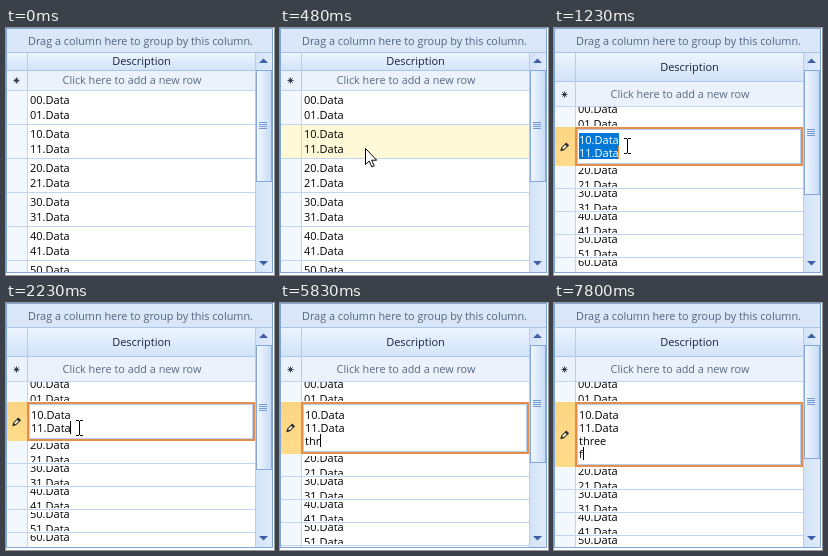
These frames come from a looping animation (268x247 px, 8 s). An HTML page with a canvas:

```html
<!DOCTYPE html>
<html lang="en">
<head>
<meta charset="utf-8">
<title>Multiline grid editor</title>
<style>
  html, body { margin: 0; width: 100%; height: 100%; overflow: hidden; background: #fff; }
  canvas { display: block; width: 268px; height: 247px; }
</style>
</head>
<body>
<canvas id="stage" width="268" height="247"></canvas>
<script>
const ctx = document.getElementById('stage').getContext('2d');
const LOOP = 8000;
const EDIT_AT = 1070, CLICK_AT = 2090, GROW_1 = 3510, GROW_2 = 6910;
const LINE = '#bfd5f0';

// time, x, y, hovered row
const ARROW = [
  [70, 158, 204, 4], [150, 132, 161, 3], [250, 106, 135, 2], [330, 93, 125, 1],
  [400, 88, 121, 1], [480, 85, 120, 1], [610, 78, 120, 1], [760, 74, 118, 1]
];
// time, x, y
const BEAM = [
  [1070, 70, 110], [1620, 70, 111], [1790, 70, 113], [1860, 70, 115], [1940, 70, 117]
];
// time, third line, caret x
const TYPING = [
  [3510, '', 25], [5280, 't', 29], [5510, 'th', 36], [5830, 'thr', 40],
  [6220, 'thre', 46], [6470, 'three', 52]
];
const CARET_OFF = [[1790, 2090], [2630, 3130], [4050, 4580], [5130, 5280], [7500, 7800]];

const stepAt = (steps, t) => steps.filter(s => s[0] <= t).pop();
const within = (t, a, b) => t >= a && t < b;

function box(x, y, w, h, fill) {
  ctx.fillStyle = fill;
  ctx.fillRect(x, y, w, h);
}

function shade(x, y, w, h, from, to, across) {
  const g = across ? ctx.createLinearGradient(x, 0, x + w, 0) : ctx.createLinearGradient(0, y, 0, y + h);
  g.addColorStop(0, from);
  g.addColorStop(1, to);
  box(x, y, w, h, g);
}

function text(str, x, y, color = '#000', align = 'left', size = 11) {
  ctx.font = size + 'px "Open Sans", "Noto Sans", sans-serif';
  ctx.textAlign = align;
  ctx.fillStyle = color;
  ctx.fillText(str, x, y);
}

function poly(points, fill, stroke) {
  ctx.beginPath();
  points.forEach(([x, y]) => ctx.lineTo(x, y));
  ctx.closePath();
  ctx.fillStyle = fill;
  ctx.fill();
  if (stroke) {
    ctx.strokeStyle = stroke;
    ctx.lineWidth = 1;
    ctx.stroke();
  }
}

function drawHead(headEnd, newEnd) {
  shade(1, 1, 265, 23, '#dae8f9', '#d8e6f7');
  text('Drag a column here to group by this column.', 22, 17, '#52647f', 'left', 10.85);
  box(1, 24, 265, 1, '#a9c4e6');

  shade(1, 25, 248, headEnd - 25, '#ecf4fe', '#d3e3f9');
  text('Description', 135.5, Math.floor((25 + headEnd) / 2) + 4, '#14233c', 'center');
  box(1, headEnd, 248, 1, '#aac6ea');

  box(1, headEnd + 1, 248, newEnd - headEnd - 1, '#ebf2fb');
  const mid = Math.round((headEnd + newEnd) / 2);
  text('Click here to add a new row', 126, mid + 4, '#596982', 'center', 10.85);
  drawStar(10.5, mid + 0.5);
  box(1, newEnd, 248, 1, LINE);
  box(21, 25, 1, newEnd - 25, '#b4cdec');
}

function drawStar(x, y) {
  ctx.strokeStyle = '#333f52';
  ctx.lineWidth = 1;
  ctx.beginPath();
  for (let i = 0; i < 4; i++) {
    const a = i * Math.PI / 4, dx = 3 * Math.cos(a), dy = 3 * Math.sin(a);
    ctx.moveTo(x - dx, y - dy);
    ctx.lineTo(x + dx, y + dy);
  }
  ctx.stroke();
}

function drawRow(n, top, height, tint) {
  const mid = Math.ceil(top + height / 2);
  ctx.save();
  ctx.beginPath();
  ctx.rect(1, top, 248, Math.min(height, 244 - top));
  ctx.clip();
  box(1, top, 248, height, tint || '#fff');
  if (!tint) box(1, top, 20, height, '#f3f8fe');
  box(21, top, 1, height, LINE);
  box(1, top, 248, 1, LINE);
  ctx.beginPath();
  ctx.rect(22, top + 3, 227, height - 4);
  ctx.clip();
  text(n + '0.Data', 24, mid - 3);
  text(n + '1.Data', 24, mid + 12);
  ctx.restore();
}

function drawPencil(y) {
  ctx.save();
  ctx.translate(10.5, y);
  ctx.rotate(-Math.PI / 4);
  poly([[-5, 0], [-2.5, -1.5], [4, -1.5], [4, 1.5], [-2.5, 1.5]], '#fff3cf', '#2b2b2b');
  poly([[-5, 0], [-2.5, -1.5], [-2.5, 1.5]], '#2b2b2b');
  box(2, -1.5, 2, 3, '#2b2b2b');
  ctx.restore();
}

function drawEditor(t, bottom) {
  const top = 99, h = bottom + 1 - top;
  shade(1, top, 20, h, '#fcd583', '#ffdc8a');
  box(21, top, 228, h, '#e58d4b');
  box(23, top + 2, 224, h - 4, '#b5d0f2');
  box(24, top + 3, 222, h - 6, '#fff');
  drawPencil(Math.round((100 + bottom) / 2));

  const selected = t < CLICK_AT;
  ['10.Data', '11.Data'].forEach((s, i) => {
    if (selected) box(25, 105 + 13 * i, 40, 13, '#0078d7');
    text(s, 25, 116 + 13 * i, selected ? '#fff' : '#000');
  });

  let line = 1, caretX = 64;
  if (t >= GROW_1) {
    const [, word, x] = stepAt(TYPING, t);
    text(word, 25, 142);
    line = 2;
    caretX = x;
  }
  if (t >= GROW_2) {
    const typed = t >= 7800;
    if (typed) text('f', 25, 155);
    line = 3;
    caretX = typed ? 29 : 25;
  }
  if (!CARET_OFF.some(([a, b]) => within(t, a, b))) {
    box(caretX, 105 + 13 * line, 1, 13, selected ? '#ff8728' : '#000');
  }
}

function drawScroll(end) {
  shade(249, 25, 17, 219, '#d3e3f8', '#dfebfb', true);
  box(249, 25, 1, 219, '#b4cdec');
  const ink = '#3d5fa8';
  poly([[253, 35], [262, 35], [257.5, 30.5]], ink);
  poly([[253, 233], [262, 233], [257.5, 237.5]], ink);
  box(250, 42, 16, end - 42, '#84a8db');
  shade(251, 43, 14, end - 44, '#f1f7fe', '#c8dcf7', true);
  const mid = Math.round((42 + end) / 2);
  for (let i = -2; i < 2; i++) box(253, mid + 2 * i, 8, 1, '#7299d2');
}

function drawArrow(x, y) {
  const shape = [[0, 0], [0, 16], [3.7, 12.6], [6.3, 18.4], [8.7, 17.3], [6.2, 11.7], [11.2, 11.7]];
  poly(shape.map(([dx, dy]) => [x + dx + 0.5, y + dy + 0.5]), '#fff', '#000');
}

function drawBeam(x, y) {
  for (const dy of [0, 15]) {
    box(x, y + dy, 3, 1, '#000');
    box(x + 4, y + dy, 3, 1, '#000');
  }
  box(x + 3, y + 1, 1, 14, '#000');
}

function drawClick(x, y) {
  ctx.fillStyle = 'rgba(255, 255, 0, 0.47)';
  ctx.beginPath();
  ctx.arc(x, y, 12, 0, 2 * Math.PI);
  ctx.fill();
}

function draw(t) {
  const editing = t >= EDIT_AT;
  const bottom = t < GROW_1 ? 137 : t < GROW_2 ? 150 : 163;
  box(0, 0, 268, 247, '#fff');

  if (editing) {
    drawRow(0, 76, 23);
    for (let n = 2, y = bottom; y < 244; n++, y += 23) drawRow(n, y, 23);
    drawHead(53, 78);
    drawEditor(t, bottom);
  } else {
    const step = stepAt(ARROW, t);
    const tint = t >= 840 ? '#ffefb8' : '#fff9d8';
    for (let n = 0; n < 6; n++) drawRow(n, 62 + 34 * n, 34, step && step[3] === n ? tint : null);
    drawHead(42, 62);
  }
  drawScroll(!editing ? 154 : t < GROW_1 ? 167 : t < GROW_2 ? 160 : 156);

  ctx.strokeStyle = '#7fa6d8';
  ctx.lineWidth = 1;
  ctx.strokeRect(0.5, 0.5, 266, 244);

  if (within(t, CLICK_AT, 2230)) drawClick(71, 124);
  if (editing) {
    if (!within(t, 5280, GROW_2) && t < 7800) drawBeam(...stepAt(BEAM, t).slice(1));
  } else if (t >= 70) {
    const [, x, y] = stepAt(ARROW, t);
    drawArrow(x, y);
  }
}

const start = performance.now();
function tick() {
  draw((performance.now() - start) % LOOP);
  requestAnimationFrame(tick);
}
tick();
</script>
</body>
</html>
```
